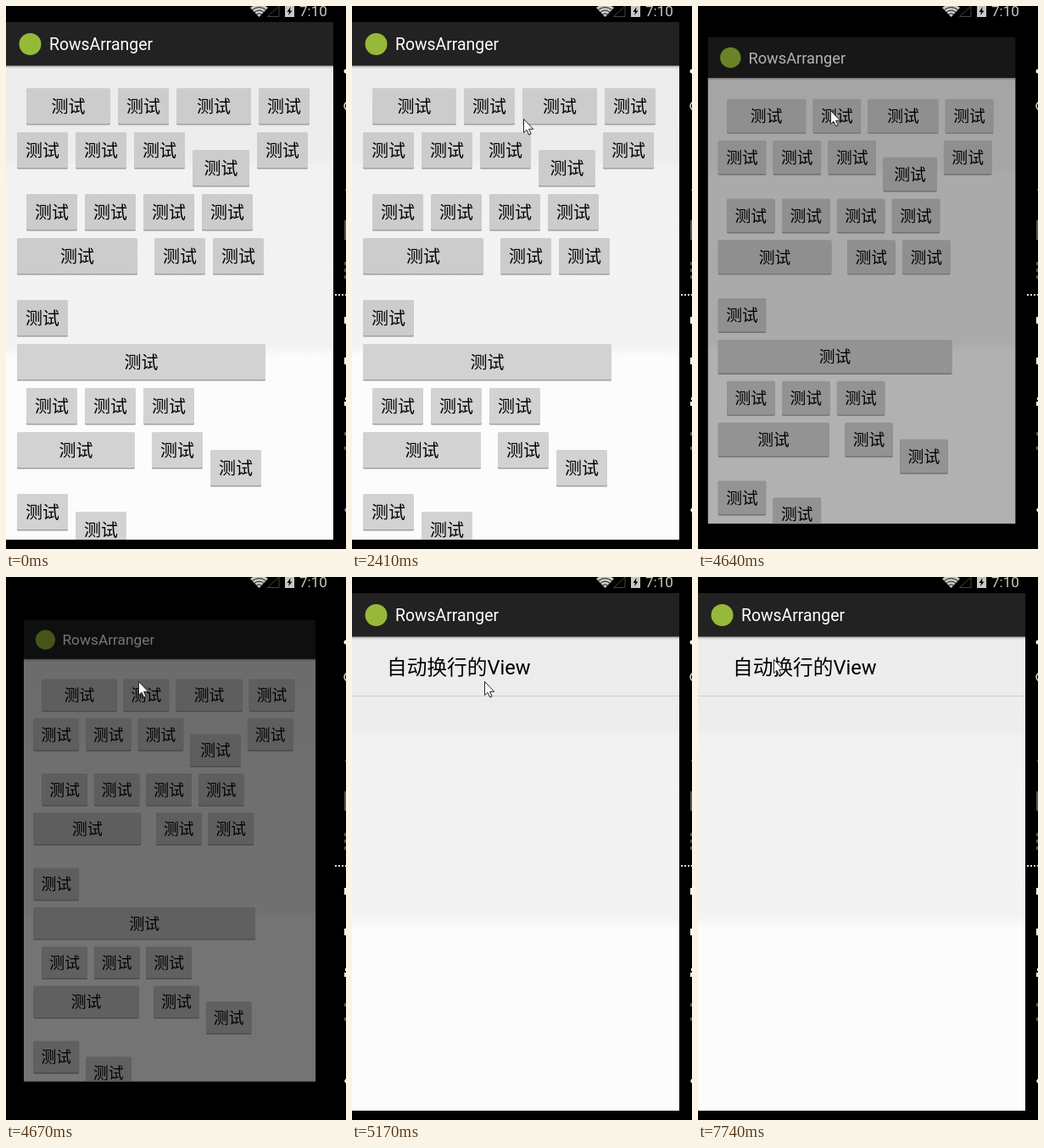
Animation of 401 by 641 pixels, one loop 8 s. Source, as an HTML page:

```html
<!DOCTYPE html>
<html lang="zh">
<head>
<meta charset="utf-8">
<style>
  html, body { margin: 0; width: 100%; height: 100%; overflow: hidden; background: #000; }
  svg { display: block; font-family: Roboto, "Noto Sans CJK SC", "Noto Sans CJK", sans-serif; }
  .label { font-size: 20px; text-anchor: middle; }
</style>
</head>
<body>
<svg width="401" height="641" viewBox="0 0 401 641">
  <defs>
    <linearGradient id="page" gradientUnits="userSpaceOnUse" x1="0" y1="71" x2="0" y2="630">
      <stop offset="0" stop-color="#ececec"/>
      <stop offset=".195" stop-color="#ededed"/>
      <stop offset=".217" stop-color="#f2f2f2"/>
      <stop offset=".59" stop-color="#f3f3f3"/>
      <stop offset=".614" stop-color="#fcfcfc"/>
    </linearGradient>
    <linearGradient id="shade" x2="0" y2="1">
      <stop stop-color="#aaa"/>
      <stop offset="1" stop-color="#aaa" stop-opacity="0"/>
    </linearGradient>
    <clipPath id="window"><rect y="19" width="386" height="611"/></clipPath>
    <g id="chrome">
      <rect y="70" width="386" height="560" fill="url(#page)"/>
      <rect y="70" width="386" height="4" fill="url(#shade)"/>
      <rect y="19" width="386" height="51.500" fill="#222"/>
      <circle cx="28.500" cy="45" r="13" fill="#97b93a"/>
      <text x="51" y="52" font-size="19.400" fill="#fff">RowsArranger</text>
    </g>
  </defs>

  <g id="status" fill="#c8c8c8">
    <path d="M288 2Q298.500-6 309 2L298.500 13Z"/>
    <path d="M290.500 4.500Q298.500-1.500 306.500 4.500M293 7.300Q298.500 3 304 7.300M295.500 10Q298.500 7.500 301.500 10"
          fill="none" stroke="#000" stroke-width=".9"/>
    <path d="M308.500 12.500H322V0Z" fill="none" stroke="#444"/>
    <path d="M329 0H340V13H329Z"/>
    <path d="M335.500 1L331.500 7H334L333 11 337.500 5.500H335Z" fill="#000"/>
    <text x="346" y="12" font-size="17">7:10</text>
  </g>

  <g id="edge" fill="#fff">
    <circle cx="401" cy="77" r="2.500"/>
    <circle cx="404" cy="118" r="5" fill="none" stroke="#ddd" stroke-width="1.500"/>
    <path d="M400 216h1v2h-1zM399 253h2v23h-2z" fill="#555"/>
    <path d="M400 302v20M400 503v6M400 520v7" stroke="#555" stroke-width="2" stroke-dasharray="4"/>
    <path d="M388 341H401" stroke="#ddd" stroke-width="2" stroke-dasharray="2"/>
    <path d="M399 367h2v8h-2zM399 415h2v8h-2zM400 462h1v3h-1zM399 467h2v5h-2z"/>
    <path id="mark" d="M401 592v6l-2-3z"/>
  </g>

  <g id="list" clip-path="url(#window)">
    <use href="#chrome"/>
    <text x="41" y="115" font-size="23.700">自动换行的View</text>
    <path d="M0 140.500H386" stroke="#ccc"/>
  </g>
  <g id="wrap" clip-path="url(#window)"><use href="#chrome"/></g>

  <path id="cursor" d="M.5.500V16.500L4 13.300 6.700 19 9.200 18 6.600 12.300H11.700Z"
        fill="#fff" stroke="#223"/>
</svg>
<script>
const LOOP = 8000;
const byId = id => document.getElementById(id);
const place = (id, name, value) => byId(id).setAttribute(name, value);

// Wrapping layout: button widths per line; > adds a left margin,
// v a top margin and _ a bottom margin
const layout = `>99 60 88 60
60 60 60 v67 60
>60 60 60 60
142 >60_ 60
60
293
>60 60 60
139 >60 v60
60 v60`;

function button(x, y, w) {
  const fill = y < 399 ? '#ccc' : '#d2d2d2';
  return `<rect x="${x}" y="${y + 1}" width="${w}" height="42.500" rx="1.500" fill="#a0a0a0"/>
    <rect x="${x}" y="${y}" width="${w}" height="42" rx="1.500" fill="${fill}"/>
    <text class="label" x="${x + w / 2}" y="${y + 29}">测试</text>`;
}

function flow(text) {
  const gap = 9, lineHeight = 52, indent = 11, drop = 21;
  let html = '', y = 97;
  for (const line of text.split('\n')) {
    let x = 13;
    for (const item of line.split(' ')) {
      const w = +item.match(/\d+/)[0];
      if (item.includes('>')) x += indent;
      html += button(x, item.includes('v') ? y + drop : y, w);
      x += w + gap;
    }
    y += /[v_]/.test(line) ? lineHeight + drop : lineHeight;
  }
  return html;
}
byId('wrap').insertAdjacentHTML('beforeend', flow(layout));

// Pointer strokes; without control points a stroke is straight and eased
const strokes = [
  { start: 570, end: 1040, to: [203, 232], bend: [[290, 370], [150, 250]] },
  { start: 1500, end: 1740, to: [179, 143] },
  { start: 1970, end: 2120, to: [202, 133] },
  { start: 4335, end: 4440, to: [156, 123] },
  { start: 5300, end: 5390, to: [140, 113] },
  { start: 6505, end: 6520, to: [134, 113] },
  { start: 6520, end: 7300, to: [101, 99], bend: [[174, 406], [95, 406]] },
  { start: 7330, end: 7580, to: [89, 97] }
];

const bezier = (a, b, c, d, k) =>
  a * (1 - k) ** 3 + 3 * b * k * (1 - k) ** 2 + 3 * c * k * k * (1 - k) + d * k ** 3;

function pointer(t) {
  let from = [396, 578];
  for (const { start, end, to, bend = [from, to] } of strokes) {
    if (t < start) break;
    const k = Math.min(1, (t - start) / (end - start));
    from = from.map((a, i) => Math.round(bezier(a, bend[0][i], bend[1][i], to[i], k)));
  }
  return from;
}

function draw(t) {
  // The closing window shrinks to 80% while it fades, on a 30 ms clock
  const step = Math.floor((t - 4610) / 30) * 30;
  const alpha = (1 - Math.min(1, Math.max(0, step / 186))) ** 2;
  const scale = .8 + .2 * alpha;
  place('wrap', 'transform', `translate(194 314) scale(${scale}) translate(-194 -314)`);
  place('wrap', 'opacity', alpha);
  place('list', 'opacity', t < 4940 ? 0 : t < 4990 ? .6 : 1);

  const moving = t >= strokes[0].start;
  place('mark', 'fill', moving ? '#fff' : '#f05a9a');
  place('cursor', 'visibility', moving ? 'visible' : 'hidden');
  place('cursor', 'transform', `translate(${pointer(t)})`);
}

function tick() {
  draw(performance.now() % LOOP);
  requestAnimationFrame(tick);
}
tick();
</script>
</body>
</html>
```
